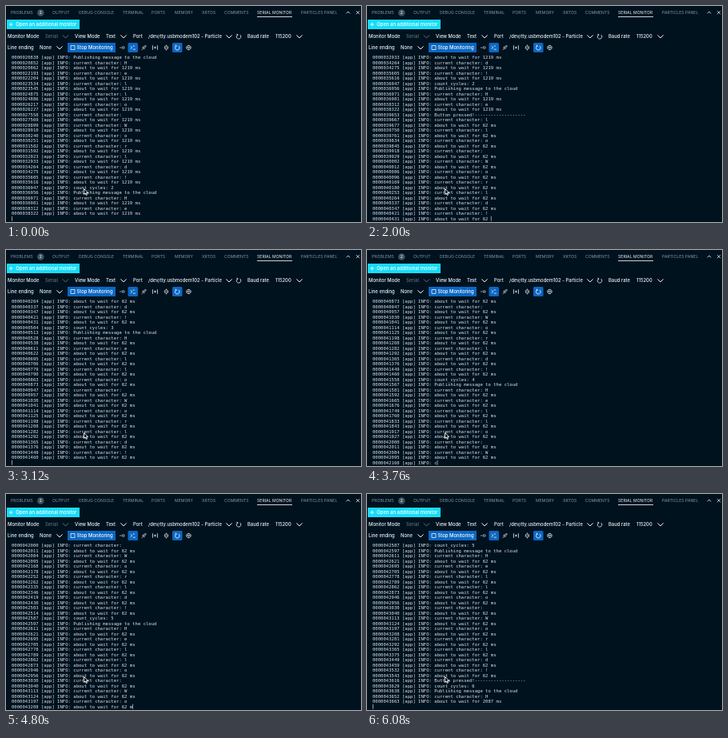
These frames come from a looping animation (444 px wide and 270 px high, 8000 ms). An HTML page with a canvas:

```html
<!DOCTYPE html>
<html lang="en">
<head>
<meta charset="utf-8">
<title>Serial monitor</title>
<style>
  html, body { margin: 0; width: 100%; height: 100%; overflow: hidden; background: #01121f; }
  canvas { display: block; width: 444px; height: 270px; }
</style>
</head>
<body>
<canvas id="stage" width="444" height="270"></canvas>
<script>
const ctx = document.getElementById('stage').getContext('2d');
const LOOP = 8000, TICK = 80, ROWS = 32, ROW_HEIGHT = 6.5;
const MONO = '"DejaVu Sans Mono", monospace', SANS = 'Inter, sans-serif';
const CHAR_WIDTH = 3.36, CHARS_PER_MS = 4.6;
const BG = '#01121f', BRIGHT = '#eef4f8', DIM = '#8596a4', FAINT = '#5f707e', BLUE = '#0b67c2';

// ---- Log: each message has a device timestamp and arrives character by character.
const log = [];
function add(time, message) {
  const stamp = Math.floor(time);
  log.push({ time: stamp, text: `${String(stamp).padStart(10, '0')} [app] INFO: ${message}\n` });
}

// The device prints a letter, announces a pause, then pauses slightly longer than announced.
function spell(letters, start, wait) {
  const period = 16.4 + 1.0868 * wait;
  [...letters].forEach((letter, i) => {
    const time = start + i * period;
    add(time, 'current character: ' + letter);
    add(time + 10.6, `about to wait for ${wait} ms`);
  });
}
function cycle(count, start, wait, letters = 'Hello World!') {
  add(start - 23.5, 'count_cycles: ' + count);
  add(start - 14.2, 'Publishing message to the cloud');
  spell(letters, start, wait);
}
const press = time => add(time, 'Button pressed!' + '-'.repeat(19));

cycle(1, 20852.37, 1219);
cycle(2, 36971.1, 1219, 'He');
press(39653);
spell('llo World!', 39667.1, 62);
cycle(3, 40528.1, 62);
cycle(4, 41581.9, 62);
cycle(5, 42611.25, 62);
press(43616);
cycle(6, 43652.5, 2087, 'H');

// Key points [stage ms, device ms]; after the last one both run at the same rate.
const clock = [[1200, 39653.54], [2000, 40440.67], [2480, 40883.1], [3760, 42173.33], [4800, 43217.89]];

function deviceTime(t) {
  if (t < clock[0][0]) return clock[0][1] - 1;
  const i = clock.findLastIndex(([start]) => start <= t);
  const [t0, d0] = clock[i], [t1, d1] = clock[i + 1] ?? [t0 + 1, d0 + 1];
  return d0 + (d1 - d0) * (t - t0) / (t1 - t0);
}

// ---- Drawing helpers
// Small type is set large and scaled down so that advances stay fractional.
function label(text, x, middle, { size = 5.9, color = BRIGHT, family = SANS, weight = 500 } = {}) {
  const zoom = 20;
  ctx.save();
  ctx.translate(x, middle + size * 0.364);
  ctx.scale(1 / zoom, 1 / zoom);
  ctx.font = `${weight} ${size * zoom}px ${family}`;
  ctx.fillStyle = color;
  ctx.fillText(text, 0, 0);
  ctx.restore();
}
function box(x, y, w, h, color, radius = 0) {
  ctx.fillStyle = color;
  ctx.beginPath();
  ctx.roundRect(x, y, w, h, radius);
  ctx.fill();
}
function stroke(path, x, y, color = BRIGHT, width = 0.8) {
  ctx.save();
  ctx.translate(x, y);
  ctx.strokeStyle = color;
  ctx.lineWidth = width;
  ctx.stroke(new Path2D(path));
  ctx.restore();
}
const chevron = (x, y, color) => stroke('M-3.6-1.8L0 1.8 3.6-1.8', x, y, color, 1);
const RELOAD = 'M1.6-2.3A2.8 2.8 0 1 1-1.2-2.5M-2.6-3.2L-1-2.6-1.6-1';
const RING = 'M0-2.7A2.7 2.7 0 1 1-.1-2.7';

function drawTabs() {
  const tabs = { 'PROBLEMS': 6, 'OUTPUT': 58, 'DEBUG CONSOLE': 91, 'TERMINAL': 146, 'PORTS': 182,
    'MEMORY': 211, 'XRTOS': 245, 'COMMENTS': 273, 'SERIAL MONITOR': 314, 'PARTICLES PANEL': 369 };
  for (const [name, x] of Object.entries(tabs))
    label(name, x, 8.4, { size: 5.15, weight: 400, color: name === 'SERIAL MONITOR' ? BRIGHT : DIM });
  box(314, 13, 44, 0.9, '#c5d3dc');
  box(39, 4.2, 8.6, 8.6, '#40515f', 4.3);
  label('2', 41.8, 8.5, { size: 5 });
  stroke('M-2.2 1.2L0-1.2 2.2 1.2', 428, 8.2);
  stroke('M-2-2L2 2M2-2L-2 2', 440, 8.2);
}

function drawControls() {
  box(1, 17, 91, 12, '#17dcf8');
  stroke('M-2.4 0H2.4M0-2.4V2.4', 6.3, 23, '#fff');
  label('Open an additional monitor', 12.3, 23, { color: '#fff' });

  const upper = { 'Monitor Mode': 2, 'View Mode': 86, 'Text': 125, 'Port': 159,
    '/dev/tty.usbmodem102 - Particle': 178, 'Baud rate': 302, '115200': 337 };
  for (const [name, x] of Object.entries(upper)) label(name, x, 38);
  label('Serial', 49, 38, { color: FAINT });
  chevron(74.5, 38.2, FAINT);
  for (const x of [147, 279, 367]) chevron(x, 38.2);
  stroke(RELOAD, 291, 38.3);

  label('Line ending', 2, 52);
  label('None', 42, 52);
  chevron(67, 52.2);
  box(77, 46, 60, 12, BLUE);
  stroke('M-2.5-2.5H2.5V2.5H-2.5Z', 83.5, 52);
  label('Stop Monitoring', 88.5, 52, { color: '#fff' });
  for (const x of [152.5, 208]) box(x, 46, 12.5, 12, BLUE, 1.5);

  stroke('M-3 0H-.4M.4-1.1H3V1.1H.4Z', 145, 52, '#a8b6c0');
  stroke('M-3-1.8L-.8 0-3 1.8M0 2.2H3.2M0-2H2.2', 158.7, 52);
  stroke('M-2.8 2.8L-1 1M0-1L1.8-2.8 2.8-1.8 1 0M-1.8 0L0 1.8 1 .8-.8-1Z', 172.5, 52);
  stroke('M-3-2.8V2.8M3-2.8V2.8M-1.4 0H1.4M0-1.4V1.4', 186.4, 52);
  stroke('M0-2.2A2.2 2.2 0 1 1-.1-2.2M0-3.4V-2.2M0 2.2V3.4M-1 0H1', 200.5, 52);
  stroke(RELOAD, 214.2, 52.2, '#fff');
  stroke(RING + 'M0-1A1 1 0 1 1-.1-1', 228.5, 52, BRIGHT, 0.9);
}

function drawLog(t) {
  const now = deviceTime(t), top = 64;
  const received = log.filter(entry => entry.time <= now)
    .map(entry => entry.text.slice(0, (now - entry.time) * CHARS_PER_MS)).join('');
  const rows = received.split('\n').slice(-ROWS);
  const style = { size: CHAR_WIDTH / 0.602, color: '#d9e2e8', family: MONO, weight: 400 };
  rows.forEach((row, i) => label(row, 7, top + i * ROW_HEIGHT, style));
  const last = rows.length - 1;
  box(7 + rows[last].length * CHAR_WIDTH, top - 2.8 + last * ROW_HEIGHT, 0.8, 6, '#b4c0c9');
}

function drawPointer() {
  const arrow = new Path2D('M97.5 228.3V235.5L99.2 234 100.3 236.5 101.5 236 100.4 233.6H102.7Z');
  ctx.strokeStyle = '#fff';
  ctx.lineWidth = 0.9;
  ctx.fillStyle = '#05080c';
  ctx.fill(arrow);
  ctx.stroke(arrow);
}

function frame() {
  const t = Math.floor(performance.now() % LOOP / TICK) * TICK;
  box(0, 0, 444, 270, BG);
  drawTabs();
  drawControls();
  drawLog(t);
  drawPointer();
  requestAnimationFrame(frame);
}
frame();
</script>
</body>
</html>
```
